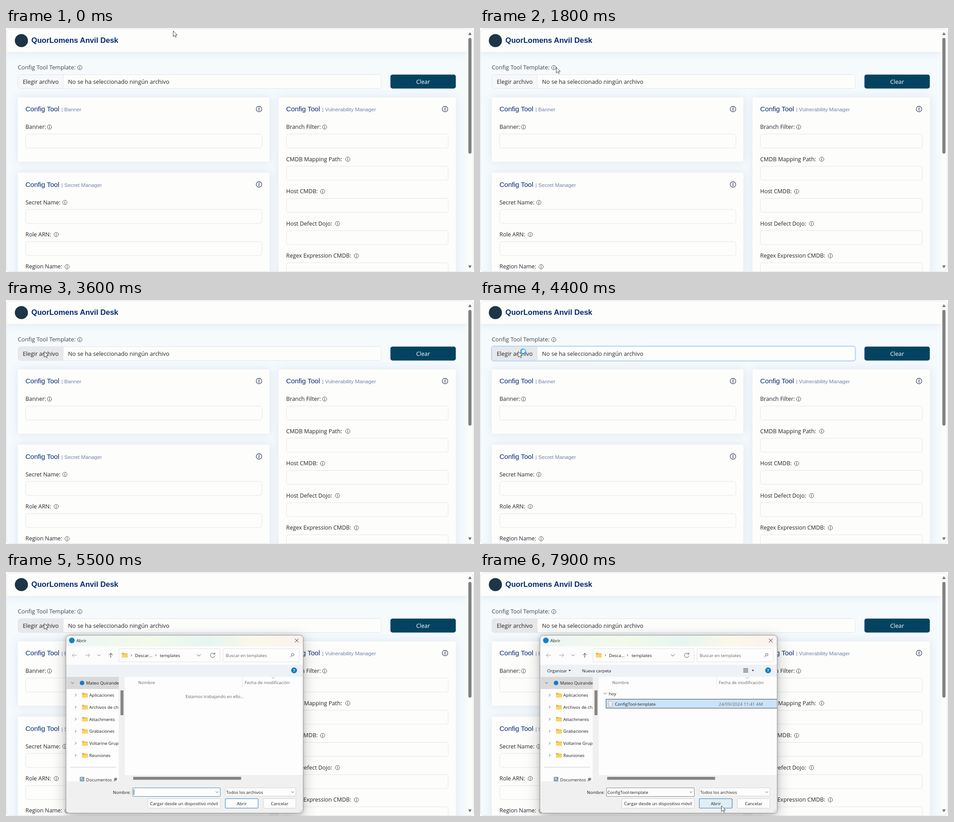
An HTML page that plays this animation: 1034 px wide and 542 px high, repeating every 8 s.

```html
<!DOCTYPE html>
<html lang="es">
<head>
<meta charset="utf-8">
<title>Config Tool</title>
<style>
html, body { margin: 0; width: 100%; height: 100%; overflow: hidden; background: #fdfdfb; }
svg { display: block; width: 1034px; height: 542px; }
text { font: 12.75px "Open Sans", sans-serif; fill: #212529; white-space: pre; }
text.soft { fill: #444; }
text.label { font-size: 12.45px; }
text.head { font: 15px "Liberation Sans", Arial, sans-serif; fill: #012970; }
text.sub { font: 11.7px "Liberation Sans", Arial, sans-serif; fill: #7282ab; }
text.brand { font: bold 16.6px "Liberation Sans", Arial, sans-serif; fill: #012970; }
text.tip { font-size: 11.15px; fill: #fff; text-anchor: middle; }
text.d { font-size: 9.55px; fill: #1c1c1c; }
text.g { font-size: 9.55px; fill: #666; }
text.date { font-size: 9.85px; fill: #666; }
text.mid { text-anchor: middle; }
.card { fill: #fdfdfc; filter: drop-shadow(0 0 10px rgba(1, 41, 112, .1)); }
.field { fill: #fdfdfc; stroke: #e1e5ea; }
.line { fill: none; stroke: #555; stroke-linecap: round; stroke-linejoin: round; }
.shadow { filter: drop-shadow(0 1px 5px rgba(0, 0, 0, .2)) drop-shadow(0 8px 16px rgba(0, 0, 0, .24)); }

.on { opacity: 0; animation: 8s step-end infinite; }
#hover { animation-name: hover; }
#tip { animation-name: tip; }
#focus { animation-name: focus; }
#busy { animation-name: busy; }
#dialog { animation-name: dialog; }
#wait { animation-name: wait; }
#caret { animation-name: caret; }
#loaded { animation-name: loaded; }
#group { animation-name: group; }
#picked { animation-name: picked; }
#press { animation-name: press; }
@keyframes hover { 23.75%, 100% { opacity: 1 } }
@keyframes tip { 25% { opacity: 1 } 37.5% { opacity: 0 } }
@keyframes focus { 48.75% { opacity: 1 } 58.75% { opacity: 0 } }
@keyframes busy { 51.25% { opacity: 1 } 58.75% { opacity: 0 } }
@keyframes dialog { 58.75%, 100% { opacity: 1 } }
@keyframes wait { 0% { opacity: 1 } 72.5% { opacity: 0 } }
@keyframes caret { 65% { opacity: 1 } 71.25% { opacity: 0 } }
@keyframes loaded { 72.5%, 100% { opacity: 1 } }
@keyframes group { 78.75% { opacity: 1 } 82.5% { opacity: 0 } }
@keyframes picked { 86.25%, 100% { opacity: 1 } }
@keyframes press { 95%, 100% { opacity: 1 } }

/* the pointer moves once every 100 ms */
#pointer { animation: pointer 8s infinite; }
@keyframes pointer {
  0%, 2.5% { transform: translate(369px, 6px); animation-timing-function: steps(3) }
  6.25% { transform: translate(318px, 28px); animation-timing-function: steps(4) }
  11.25% { transform: translate(232px, 70px); animation-timing-function: steps(3) }
  15% { transform: translate(219.5px, 75px); animation-timing-function: steps(4) }
  20% { transform: translate(178px, 84px); animation-timing-function: steps(3) }
  23.75%, 36.25% { transform: translate(163px, 88px); animation-timing-function: steps(4) }
  41.25% { transform: translate(102px, 109px); animation-timing-function: steps(3) }
  45%, 72.5% { transform: translate(84px, 114px); animation-timing-function: steps(3) }
  76.25% { transform: translate(258px, 240px); animation-timing-function: steps(3) }
  80%, 87.5% { transform: translate(338px, 287.5px); animation-timing-function: steps(4) }
  92.5% { transform: translate(476px, 452px); animation-timing-function: steps(4) }
  97.5%, 100% { transform: translate(533px, 519px) }
}
</style>
</head>
<body>
<script>
const text = (x, y, s, cls = '') => `<text x="${x}" y="${y}" class="${cls}">${s}</text>`;
const rect = (x, y, w, h, fill, more = '') =>
  `<rect x="${x}" y="${y}" width="${w}" height="${h}" fill="${fill}" ${more}/>`;
const box = (x, y, w, h, stroke, fill = '#fdfdfd', r = 1.5) =>
  rect(x, y, w, h, fill, `stroke="${stroke}" rx="${r}"`);
const line = (d, more = '') => `<path class="line" d="${d}" ${more}/>`;
const on = (id, body) => `<g id="${id}" class="on">${body}</g>`;

const info = (x, y, r = 5, color = '#333') =>
  `<g transform="translate(${x} ${y}) scale(${r / 5})" fill="none" stroke="${color}" stroke-width=".85">
   <circle r="4.8"/><path d="M-.9-.9H.25L-.3 2.5H.8"/><circle cx=".3" cy="-2.5" r=".25"/></g>`;
const field = (x, y, w) => `<rect class="field" x="${x + .5}" y="${y + .5}" width="${w}" height="31" rx="5"/>`;
const card = (x, y, w, h) => `<rect class="card" x="${x}" y="${y}" width="${w}" height="${h}" rx="3.5"/>`;
const title = (x, y, name, iconX) =>
  text(x, y, 'Config Tool', 'head') + text(x + 79.5, y, '| ' + name, 'sub') + info(iconX, y - 5, 6.4, '#26304a');
const row = (x, y, w, label, iconX) =>
  text(x, y + 4.5, label, 'label') + info(iconX, y + .5) + field(x, y + 15.5, w);

const down = (x, y, s = 3) => line(`M${x - s} ${y - s / 2}l${s} ${s} ${s}-${s}`);
const right = (x, y, s = 2.5) => line(`M${x - s / 2} ${y - s}l${s} ${s}-${s} ${s}`);
const folder = (x, y) =>
  `<path d="M${x} ${y - 5}h4.5l1.5 1.5h6.5v8.5h-12.5z" fill="#e9ae2c"/>` + rect(x, y - 2, 12.5, 7, '#fbd364', 'rx=".8"');

const page = () => {
  const labels = ['Branch Filter:', 'CMDB Mapping Path:', 'Host CMDB:', 'Host Defect Dojo:', 'Regex Expression CMDB:'];
  const icons = [704, 755, 699.5, 732.5, 774];
  const choose = 'M127 104v30H31q-4 0-4-4V108q0-4 4-4z';
  return rect(0, 0, 1034, 542, '#f5fafd')
    + '<rect class="card" x="0" y="0" width="1019" height="53"/>'
    + '<circle cx="34" cy="28" r="14.5" fill="#1d3545"/>'
    + text(56, 33.3, 'QuorLomens Anvil Desk', 'brand')
    + text(26, 92, 'Config Tool Template:', 'soft') + info(163, 88)
    + field(26, 103, 802.5)
    + `<path d="${choose}" fill="#f7f8fa"/>` + on('hover', `<path d="${choose}" fill="#e6e8ea"/>`)
    + line('M126.5 104v30', 'style="stroke:#e1e5ea"')
    + on('focus', rect(25.5, 102.5, 804, 33, 'none', 'rx="5" stroke="#b4d5f2" stroke-width="2"'))
    + text(37, 124, 'Elegir archivo') + text(137, 124, 'No se ha seleccionado ningún archivo')
    + rect(849.4, 103.4, 144.4, 31, '#04435f', 'rx="4.5"')
    + '<text x="921.5" y="124" class="mid" style="fill:#fff">Clear</text>'
    + card(26, 154, 556, 143) + title(43, 185, 'Banner', 559)
    + row(43, 219.5, 522, 'Banner:', 96)
    + card(26, 321, 556, 300) + title(43, 352.5, 'Secret Manager', 559)
    + row(43, 387, 522, 'Secret Name:', 130)
    + row(43, 458.3, 522, 'Role ARN:', 111)
    + row(43, 529.8, 522, 'Region Name:', 135)
    + card(602, 154, 392, 460) + title(619, 185, 'Vulnerability Manager', 970)
    + labels.map((s, i) => row(619, 219.5 + i * 71.5, 357.5, s, icons[i])).join('')
    + rect(1019, 0, 15, 542, '#fcfcfb')
    + rect(1021.5, 22, 7, 257, '#808080', 'rx="3.5"')
    + '<path d="M1021 15.5l4-6 4 6zM1021 527.5l4 6 4-6z" fill="#707070"/>';
};

const tooltip = () => {
  const lines = ['Upload an anvilDesk', 'template if you already have', 'one created that you want to', 'edit.'];
  return on('tip', '<g opacity=".92">' + rect(173, 49, 168, 77, '#000', 'rx="5"') + '<path d="M173 82v10l-5-5z"/></g>'
    + lines.map((s, i) => text(257, 66 + i * 17.6, s, 'tip')).join(''));
};

const tree = () => {
  const names = ['Aplicaciones', 'Archivos de chat', 'Attachments', 'Grabaciones', 'Voltarine Grupos', 'Reuniones'];
  return rect(134, 233, 115, 27, '#d9d9d9') + down(147, 246.5)
    + '<circle cx="168" cy="246.5" r="5" fill="#1479cf"/>'
    + text(177, 250, 'Mateo Quirandel', 'd')
    + names.map((s, i) => {
      const y = 273.5 + i * 26.75;
      return right(154, y) + folder(168, y) + text(184, y + 3.5, s, 'd');
    }).join('')
    + line('M142 433.5H243', 'style="stroke:#ccc"')
    + rect(163, 455, 10, 11, '#7b98ac', 'rx="1"') + rect(165, 457, 4, 2, '#fff') + line('M165 461.5h6', 'style="stroke:#fff"')
    + text(177, 464.5, 'Documentos', 'd')
    + line('M238.5 464.5l2.5-3M239 459l4 4M240.5 459.5l2.5-2 2 2-2 2.5z', 'stroke-width="1.3"');
};

const crumbs = (name, x) => text(285, 188.5, name, 'd') + right(x, 185, 2) + text(x + 9, 188.5, 'templates', 'd');

const dialog = () => on('dialog',
  rect(132.5, 140.5, 524, 395, '#f0f0f0', 'rx="7" class="shadow"')
  + '<g clip-path="url(#frame)">'
  + rect(132, 140, 525, 26, 'url(#bar)')
  + rect(132, 165, 525, 41, '#fcfcfc') + rect(132, 206, 525, 27, '#eef1f6')
  + rect(134, 233, 115, 232, '#fdfdfd') + rect(262.5, 233, 394, 218, '#fdfdfd')
  + '</g>'
  + '<circle cx="145.5" cy="152" r="6.2" fill="#1b7fc4"/>' + text(155.5, 155.5, 'Abrir', 'd')
  + line('M638.5 148.5l7.5 7.5m0-7.5l-7.5 7.5', 'style="stroke:#222"')
  + line('M156 185h-9.5m4-4l-4 4 4 4M175.5 185h9.5m-4-4l4 4-4 4', 'style="stroke:#999"')
  + down(205.5, 185, 2.5) + line('M231.5 190v-9.5m-4 4l4-4 4 4', 'style="stroke:#333"')
  + box(249.5, 170.5, 223, 29, '#e2e2e2') + folder(256, 184.5) + right(277, 185, 2)
  + down(426, 185, 4)
  + line('M460.5 182a5 5 0 1 0 1 4M461.5 179.5v3h-3')
  + box(479.5, 170.5, 168.5, 29, '#e2e2e2') + text(485.5, 189, 'Buscar en templates', 'g')
  + '<g class="line"><circle cx="633.5" cy="183.5" r="2.8"/><path d="M631.5 185.5l-3 3.5"/></g>'
  + '<circle cx="636.5" cy="218.5" r="6.5" fill="#117dbb"/><text x="636.5" y="222" class="d mid" style="fill:#fff;font-weight:bold">?</text>'
  + `<g clip-path="url(#side)">${tree()}</g>`
  + rect(253, 263, 6.5, 55, '#858585')
  + rect(281, 455, 238.5, 6.5, '#858585')
  + line('M522.5 233v23', 'style="stroke:#e4e4e4"') + line('M587.5 234l3 2.5 3-2.5', 'style="stroke:#999"')
  + text(292, 248.5, 'Nombre', 'g') + text(527.5, 248.5, 'Fecha de modificación', 'g')
  + text(236, 493, 'Nombre:', 'd')
  + box(279.5, 479.5, 194, 19, '#4a8fc0')
  + on('caret', rect(282, 482.5, 1, 13, '#111'))
  + box(484.5, 479.5, 156, 18, '#d4d4d4') + text(486.5, 493, 'Todos los archivos', 'd') + down(633.5, 489, 2.5)
  + box(313.5, 503.5, 160, 21, '#d4d4d4') + '<text x="393.5" y="517.5" class="d mid">Cargar desde un dispositivo móvil</text>'
  + box(484.5, 503.5, 72.5, 21, '#2f80b5') + on('press', box(484.5, 503.5, 72.5, 21, '#2f80b5', '#e0eef6'))
  + box(568.5, 503.5, 72, 21, '#d4d4d4')
  + '<text x="521" y="517.5" class="d mid">Abrir</text><text x="604.5" y="517.5" class="d mid">Cancelar</text>'
  + '<path d="M648 533l6-6m-3 6l3-3" stroke="#aaa" stroke-dasharray="1.5 1"/>'
  + on('wait', crumbs('Descar...', 331) + '<text x="461" y="279.5" class="g mid">Estamos trabajando en ello...</text>')
  + on('loaded', crumbs('Desca...', 326)
    + text(148.5, 222.5, 'Organizar', 'd') + '<path d="M195.5 217.5h5l-2.5 3zM600.5 217.5h5l-2.5 3z" fill="#222"/>'
    + text(225.5, 222.5, 'Nueva carpeta', 'd')
    + line('M582 214.5h10m-10 2.7h10m-10 2.7h10m-10 2.7h10', 'style="stroke:#333"')
    + on('group', rect(266, 261.5, 390, 19, '#e5f3fd'))
    + on('picked', rect(278.5, 282.5, 378, 20, '#cbe3f8') + line('M656 282.5H278.5v20H656', 'style="stroke:#444"')
      + box(279.5, 479.5, 194, 19, '#8a8a8a') + text(281.5, 493, 'ConfigTool-template', 'd'))
    + down(276.5, 270, 3) + text(284.5, 274, 'hoy', 'd')
    + '<path d="M284 287.5h6l2.5 2.5v9H284z" fill="#fdfdfd" stroke="#999" stroke-width=".8"/>'
    + '<path d="M287.5 291.5q-1.3 0-1 2l-.8.6.8.6q-.3 2 1 2M289.5 291.5q1.3 0 1 2l.8.6-.8.6q.3 2-1 2" fill="none" stroke="#999" stroke-width=".7"/>'
    + text(298, 297, 'ConfigTool-template', 'd') + text(527.5, 297, '24/09/2024 11:41 AM', 'date'))
  + down(466, 489, 2.5)
  + rect(132.5, 140.5, 524, 395, 'none', 'rx="7" stroke="#999"'));

const pointer = '<g id="pointer"><path d="M.5.5v12.6l2.9-2.8 2 4.3 2-.9-2-4.2h4z" fill="#fff" stroke="#333" stroke-width=".9"/>'
  + on('busy', '<circle cx="11.5" cy="0" r="5" fill="#fff" stroke="#2e9ae0" stroke-width="2.6"/>'
    + '<path d="M11.5-5a5 5 0 0 1 5 5" fill="none" stroke="#86c8f0" stroke-width="2.6"/>') + '</g>';

document.body.innerHTML = `<svg viewBox="0 0 1034 542">
  <defs>
    <clipPath id="window"><rect x="1" y="2" width="1032" height="539" rx="8"/></clipPath>
    <clipPath id="frame"><rect x="132.5" y="140.5" width="524" height="395" rx="7"/></clipPath>
    <clipPath id="side"><rect x="134" y="233" width="115" height="232"/></clipPath>
    <linearGradient id="bar">
      <stop offset="0" stop-color="#edf5f6"/><stop offset=".35" stop-color="#f3faea"/>
      <stop offset=".6" stop-color="#e6f5f1"/><stop offset=".8" stop-color="#fbf8e8"/>
      <stop offset="1" stop-color="#fbf1ef"/>
    </linearGradient>
  </defs>
  <g clip-path="url(#window)">${page()}</g>
  ${rect(1, 2, 1031.5, 539, 'none', 'rx="8" stroke="#dfe2e8"')}
  ${tooltip()}${dialog()}${pointer}
</svg>`;
</script>
</body>
</html>
```
